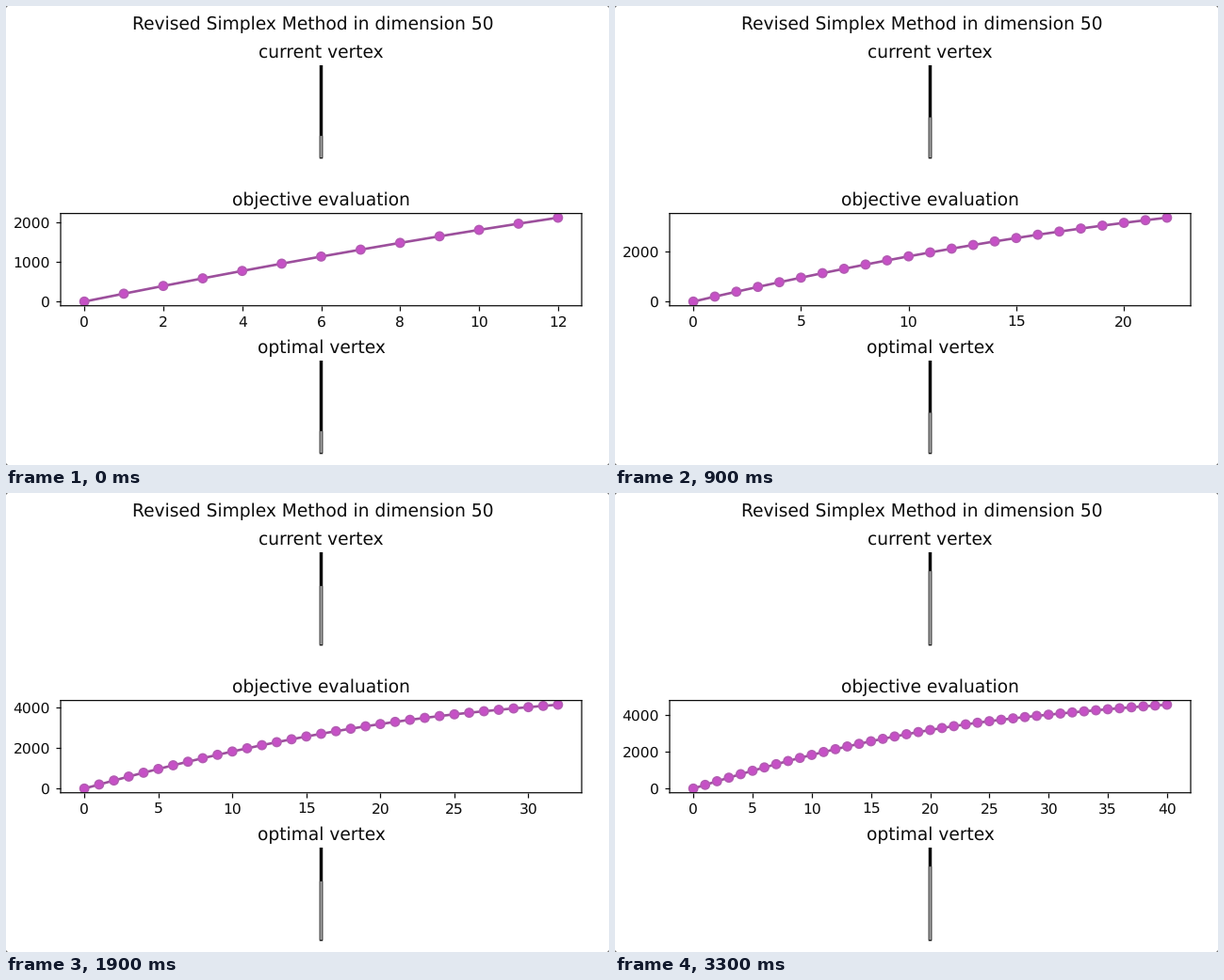
Animation, 640 px wide and 488 px high, one loop 3400 ms. Source, as a matplotlib script:

```python
import numpy as np
import matplotlib.pyplot as plt
from matplotlib.animation import FuncAnimation
from matplotlib.patches import Polygon, Rectangle

W, H, DPI = 640, 488, 128
FRAMES, INTERVAL = 34, 100
MID = 334.5          # horizontal centre of the plots
BAR_H = 98.1
CELL = BAR_H / 50    # height of one vertex entry
INK = "#0c0c0c"


def pt(size):
    """Point size as it looks at 111.5 dpi."""
    return size * 111.5 / DPI


plt.rcParams.update({
    "font.family": "DejaVu Sans",
    "font.size": pt(10),
    "text.hinting": "no_hinting",
    "text.color": INK, "axes.edgecolor": INK,
    "xtick.color": INK, "ytick.color": INK,
    "axes.linewidth": pt(0.8),
    "xtick.major.size": pt(3.5), "ytick.major.size": pt(3.5),
    "xtick.major.width": pt(0.8), "ytick.major.width": pt(0.8),
    "xtick.major.pad": pt(3.5), "ytick.major.pad": pt(3.5),
})

# The gain per pivot shrinks as the method nears the optimum.
pivots = np.arange(1, 41)
gain = np.interp(pivots, [1, 3.5, 9.5, 15.5, 21.5, 26, 30, 35.5, 40],
                 [200, 191, 165, 135, 104, 78, 63, 55, 45])
objective = np.concatenate([[0], np.cumsum(gain)])


def pivot_at(frame):
    pace = np.interp(frame, [0, 6, 11, 12, 15, 19, 27, 30],
                     [12, 18, 24, 24, 27, 32, 38, 40])
    return int(np.round(pace))


fig = plt.figure(figsize=(W / DPI, H / DPI), dpi=DPI, facecolor="white")

# Full-stage layer in pixel coordinates, y downwards
stage = fig.add_axes([0, 0, 1, 1])
stage.set_xlim(0, W)
stage.set_ylim(H, 0)
stage.axis("off")


def label(x, y, text):
    stage.text(x, y, text, size=pt(12), ha="center", va="baseline")


label(325.6, 25, "Revised Simplex Method in dimension 50")
label(MID, 55, "current vertex")
label(MID, 212, "objective evaluation")
label(MID, 369, "optimal vertex")

for x, dx in ((0, 2), (W, -2)):
    for y, dy in ((0, 2), (H, -2)):
        stage.add_patch(Polygon([(x, y), (x + dx, y), (x, y + dy)],
                                fc="#777777", lw=0))


def column(top, width, height, color):
    return stage.add_patch(Rectangle((MID - width / 2, top), width, height,
                                     fc=color, lw=0, snap=False))


def vertex_bar(top):
    """Black framed column; returns its grey rim and lighter core."""
    column(top - 0.6, 3.5, BAR_H + 1.2, INK)
    return column(top, 3.5, 1, "#4a4a4a"), column(top, 1.5, 1, "#acacac")


bars = [(top, vertex_bar(top)) for top in (63.6, 377.6)]

left, right, top, bottom = 58, 611, 220.6, 318.7
ax = fig.add_axes([left / W, 1 - bottom / H, (right - left) / W, (bottom - top) / H])
for spine in ax.spines.values():
    spine.set_snap(False)

curve, = ax.plot([], [], color="#9c4f9c", lw=pt(1.7))
dots = ax.scatter([], [], s=pt(6) ** 2, lw=pt(1), ec="#b25cb2", zorder=2.1)
# Cycling two equal colours keeps the dots from being rounded to whole pixels.
dots.set_facecolor(["#c650c6"] * 2)


def draw(frame):
    n = pivot_at(frame)
    steps = np.arange(n + 1)
    curve.set_data(steps, objective[:n + 1])
    dots.set_offsets(np.column_stack([steps, objective[:n + 1]]))
    ax.relim()
    ax.autoscale_view()
    for bar_top, parts in bars:
        for part in parts:
            part.set_y(bar_top + BAR_H - n * CELL)
            part.set_height(n * CELL - 0.6)
    return [curve, dots] + [part for _, parts in bars for part in parts]


anim = FuncAnimation(fig, draw, frames=FRAMES, interval=INTERVAL,
                     init_func=lambda: draw(0), repeat=True, repeat_delay=0,
                     blit=False)
plt.show()
```
